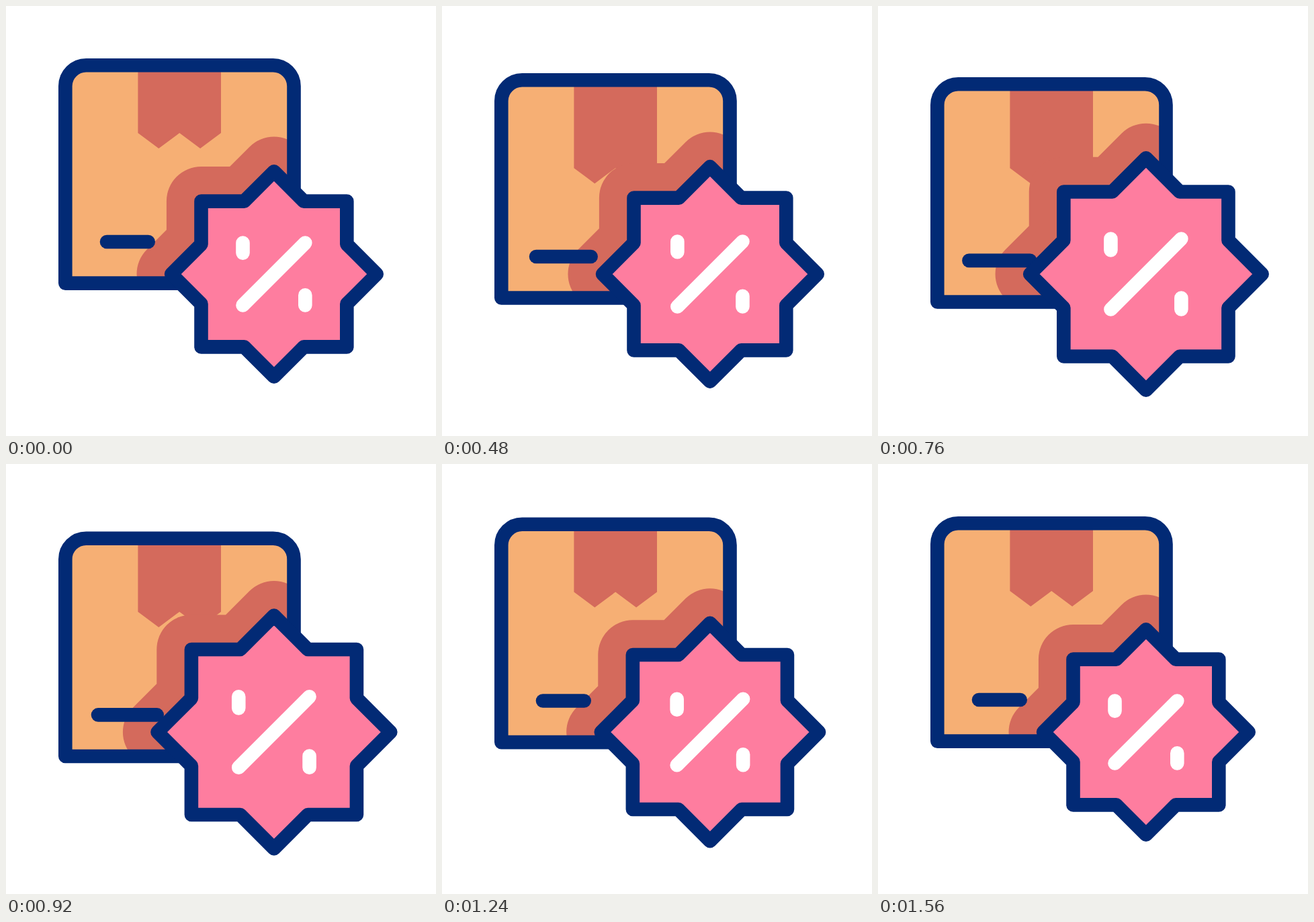
Write an HTML page that moves like this. It is 640 px wide and 640 px high and loops after 1720 ms.

```html
<!DOCTYPE html>
<html lang="en">
<head>
<meta charset="utf-8">
<title>Parcel discount</title>
<style>
  html, body { margin: 0; width: 100%; height: 100%; overflow: hidden; background: #fff; }
  svg { display: block; width: 100vw; height: 100vh; }
  .line { stroke: #022a75; stroke-width: 20.6; stroke-linecap: round; stroke-linejoin: round; }
  .tape { fill: #d46a5c; }
</style>
</head>
<body>
<svg viewBox="0 0 640 640">
  <defs>
    <path id="box" d="M88.3 412.6V119.3A31 31 0 0 1 119.3 88.3H397.5A31 31 0 0 1 428.5 119.3V412.6Z"/>
    <clipPath id="inside"><use id="clipBox" href="#box"/></clipPath>
  </defs>
  <use class="box" href="#box" fill="#f6af74"/>
  <g clip-path="url(#inside)">
    <path id="tape" class="tape"/>
    <path id="shade" class="tape" stroke="#d46a5c" stroke-width="103.2" stroke-linejoin="round"/>
  </g>
  <use class="box line" href="#box" fill="none"/>
  <path id="label" class="line" fill="none"/>
  <path id="star" class="line" fill="#fe7d9f"/>
  <path id="percent" fill="none" stroke="#fff" stroke-width="20.6" stroke-linecap="round"/>
</svg>
<script>
const LOOP = 1720, STEP = 40;
const CX = 398.9, CY = 399;
const TIP = 152.8, SIDE = 108.4;
const $ = id => document.getElementById(id);
const boxes = [...document.querySelectorAll('.box'), $('clipBox')];

function ease(t, from, to) {
  const p = Math.min(1, Math.max(0, (t - from) / (to - from)));
  return p * p * (3 - 2 * p);
}

// Rises from a to b, rests, then falls back from c to d.
const swell = (t, a, b, c, d) => ease(t, a, b) - ease(t, c, d);

function starPath(k) {
  const tip = TIP * k, side = SIDE * k, notch = tip - side;
  const pts = [];
  for (let i = 0; i < 4; i++) {
    const c = Math.round(Math.cos(i * Math.PI / 2));
    const s = Math.round(Math.sin(i * Math.PI / 2));
    for (const [x, y] of [[0, -tip], [notch, -side], [side, -side], [side, -notch]])
      pts.push((CX + x * c - y * s).toFixed(2) + ' ' + (CY + x * s + y * c).toFixed(2));
  }
  return 'M' + pts.join('L') + 'Z';
}

function percentPath(k) {
  const at = (x, y) => (CX + x * k) + ' ' + (CY + y * k);
  return `M${at(46.4, -46.4)}L${at(-46.4, 46.4)}` +
    `M${at(-46.4, -46.4)}L${at(-46.4, -31.4)}` +
    `M${at(46.4, 31.4)}L${at(46.4, 46.4)}`;
}

function draw(t) {
  const drop = 27.9 * swell(t, 78, 650, 762, 1318);
  const pull = 33 * swell(t, 70, 570, 600, 1080);
  const grow = 14.6 * swell(t, 228, 632, 845, 1210);
  const k = 1 + 20.6 / TIP * swell(t, 260, 820, 935, 1510);

  boxes.forEach(b => b.setAttribute('transform', `translate(0 ${drop})`));
  const hem = 189 + drop + pull;
  $('tape').setAttribute('d',
    `M196.4 ${88 + drop}V${hem}l30.9 23l30.9 -23l30.9 23l30.9 -23V${88 + drop}Z`);
  $('label').setAttribute('d', `M${150 - grow} ${351 + drop}H${211.7 + grow}`);

  const star = starPath(k);
  $('shade').setAttribute('d', star);
  $('star').setAttribute('d', star);
  $('percent').setAttribute('d', percentPath(k));
}

const start = performance.now();
function tick() {
  const t = (performance.now() - start) % LOOP;
  draw(Math.floor(t / STEP) * STEP);
  requestAnimationFrame(tick);
}
tick();
</script>
</body>
</html>
```
